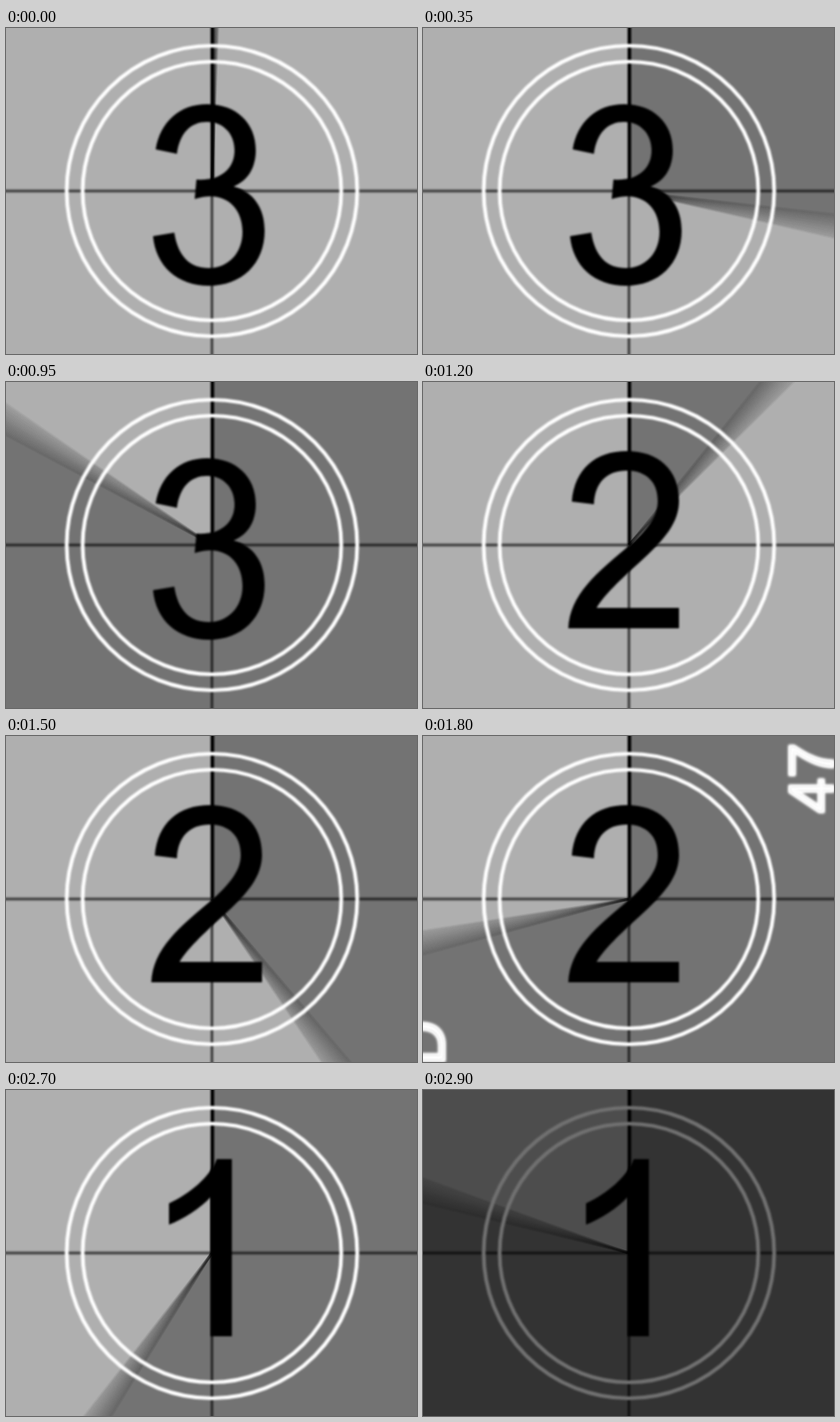
These frames come from a looping animation (464 px wide and 368 px high, 2950 ms). An HTML page with a canvas:

```html
<!DOCTYPE html>
<html lang="en">
<head>
<meta charset="utf-8">
<title>Film leader countdown</title>
<style>
  html, body { margin: 0; width: 100%; height: 100%; overflow: hidden; background: #afafaf; }
  canvas { display: block; }
</style>
</head>
<body>
<canvas id="stage" width="464" height="368"></canvas>
<script>
const W = 464, H = 368, CX = 232.5, CY = 184;
const LOOP = 2950, STEP = 50, TURN = 25;
const LIGHT = '#afafaf', DARK = '#737373';
const ctx = document.getElementById('stage').getContext('2d');

const digits = [
  'M169 137C174 106 196 86 227 86C260 86 282 107 282 138C282 158 273 172 257 179' +
  'C280 185 292 204 292 229C292 266 266 291 229 291C194 291 169 269 166 235L190 231' +
  'C194 257 207 271 229 271C251 271 267 254 267 230C267 206 252 190 231 190' +
  'C225 190 220 191 213 193L215 171C241 173 258 160 258 138C258 119 245 106 227 106' +
  'C208 106 196 119 193 142Z',
  'M168 135C171 98 195 78 230 78C266 78 289 99 289 134C289 158 274 177 244 204' +
  'C223 223 204 241 196 255L289 255L289 278L164 278C166 240 195 216 235 183' +
  'C256 163 265 150 265 134C265 113 252 100 230 100C207 100 194 114 193 138Z',
  'M255 78L255 278L231 278L231 121C220 133 200 146 184 152L184 128C208 117 230 98 238 78Z'
].map(d => new Path2D(d));

const rad = deg => (deg - 90) * Math.PI / 180;
const clamp = (v, lo, hi) => Math.min(hi, Math.max(lo, v));

function line(x1, y1, x2, y2, width, color) {
  ctx.lineWidth = width;
  ctx.strokeStyle = color;
  ctx.beginPath();
  ctx.moveTo(x1, y1);
  ctx.lineTo(x2, y2);
  ctx.stroke();
}

function ring(r) {
  ctx.lineWidth = 4.2;
  ctx.strokeStyle = '#fff';
  ctx.beginPath();
  ctx.arc(CX, CY, r, 0, 2 * Math.PI);
  ctx.stroke();
}

// Shaded sector and its hand, smeared over half a film frame.
function sweep(angle) {
  const from = clamp(angle - 4.5, 0, 360), to = clamp(angle + 2.2, 0, 360);
  const g = ctx.createConicGradient(rad(0), CX, CY);
  g.addColorStop(0, DARK);
  g.addColorStop(from / 360, DARK);
  g.addColorStop(to / 360, LIGHT);
  g.addColorStop(1, LIGHT);
  ctx.fillStyle = g;
  ctx.fillRect(0, 0, W, H);

  const n = 24;
  for (let i = 0; i < n; i++) {
    const a = rad(from + (to - from) * (i + 0.5) / n);
    line(CX, CY, CX + 320 * Math.cos(a), CY + 320 * Math.sin(a), 3, `rgba(0,0,0,${1 / n})`);
  }
}

function sideText(text, x, y, align) {
  ctx.save();
  ctx.translate(x, y);
  ctx.rotate(-Math.PI / 2);
  ctx.font = '71px "Liberation Sans", Arial, sans-serif';
  ctx.textAlign = align;
  ctx.lineWidth = 4;
  ctx.lineJoin = 'round';
  ctx.fillStyle = ctx.strokeStyle = '#fff';
  ctx.fillText(text, 0, 0);
  ctx.strokeText(text, 0, 0);
  ctx.restore();
}

function draw(ms) {
  const n = Math.floor(ms / STEP);
  // 25 fps film on a 20 fps clock, with a slower start
  const film = Math.max(n, Math.floor(1.25 * n - 1.8));
  const digit = Math.min(2, Math.floor(film / TURN));

  ctx.filter = 'none';
  sweep((film % TURN) * 360 / TURN);

  ctx.filter = 'blur(1.1px)';
  line(-9, CY, W + 9, CY, 3, 'rgba(0,0,0,.66)');
  line(CX, CY, CX, H + 9, 3, 'rgba(0,0,0,.64)');
  line(CX + 0.5, -9, CX + 0.5, CY, 4, '#000');

  ctx.filter = 'blur(0.9px)';
  ctx.fillStyle = '#000';
  ctx.fill(digits[digit]);
  ring(164);
  ring(146);

  if (n === 36) {
    ctx.filter = 'blur(1.6px)';
    sideText('47', 463, 87, 'left');
    sideText('D', 24, 321, 'right');
  }

  ctx.filter = 'none';
  const dim = clamp((film - 65) / 9, 0, 1);
  if (dim) {
    ctx.fillStyle = `rgba(0,0,0,${dim})`;
    ctx.fillRect(0, 0, W, H);
  }
}

const start = performance.now();
function tick() {
  draw((performance.now() - start) % LOOP);
  requestAnimationFrame(tick);
}
tick();
</script>
</body>
</html>
```
